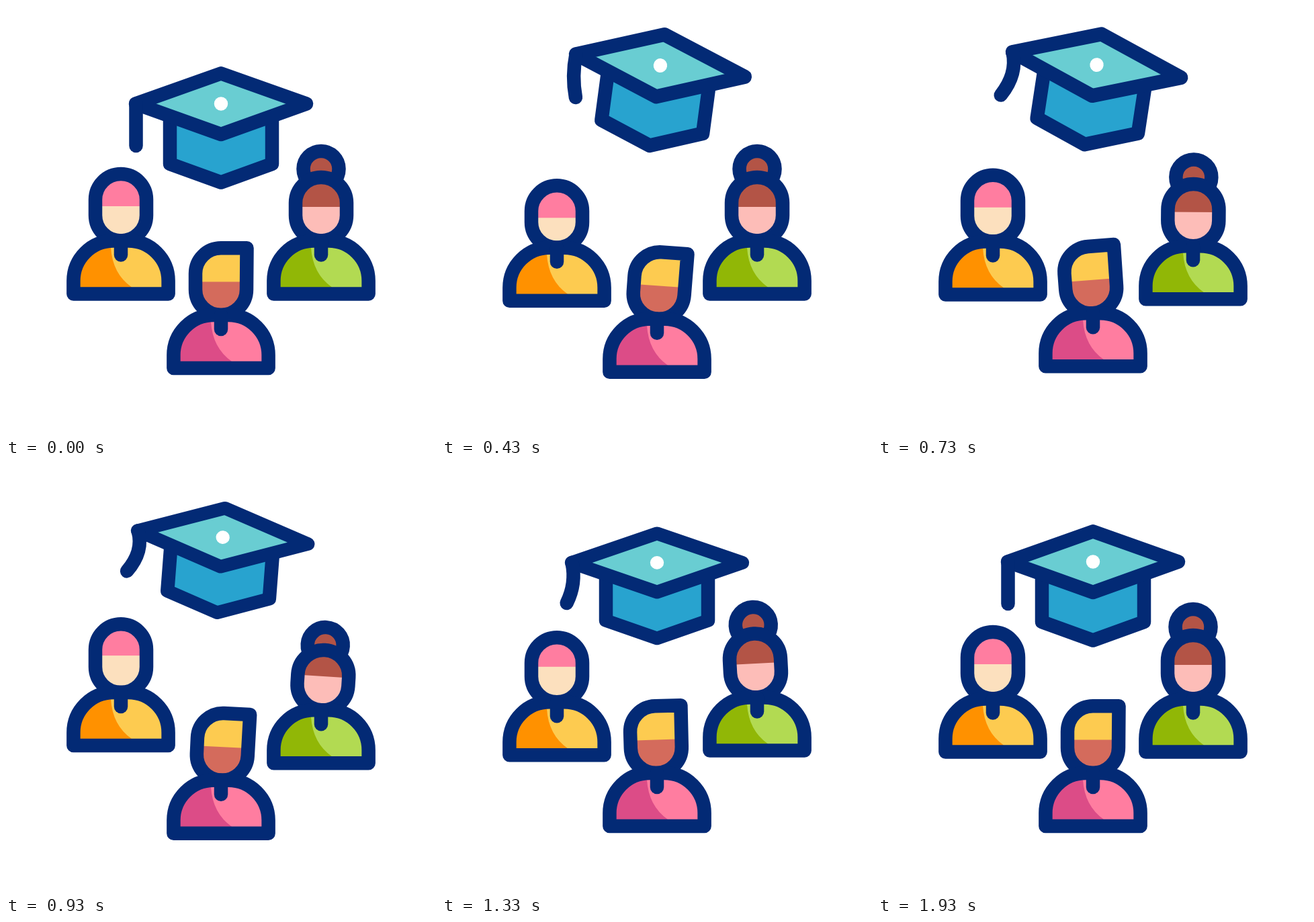
An HTML page with a canvas for the animation above (2.37 s loop, 640x640 px).

```html
<!DOCTYPE html>
<html lang="en">
<head>
<meta charset="utf-8">
<title>Graduates</title>
<style>
html, body { margin: 0; width: 100%; height: 100%; overflow: hidden; background: #fff; }
canvas { display: block; width: 640px; height: 640px; }
</style>
</head>
<body>
<canvas id="stage" width="640" height="640"></canvas>
<script>
const ctx = document.getElementById('stage').getContext('2d');
const LOOP = 2370;
const NAVY = '#032a75';
const BEAT = 300;
const RAD = Math.PI / 180;

// Smooth swing from rest through evenly spaced peaks and back to rest
function swing(t, peaks, step = BEAT) {
  const i = Math.floor(t / step);
  const p = t / step - i;
  const from = peaks[i - 1] || 0, to = peaks[i] || 0;
  return from + (to - from) * p * p * (3 - 2 * p);
}

function poly(points, close) {
  ctx.beginPath();
  points.forEach(([x, y]) => ctx.lineTo(x, y));
  if (close) ctx.closePath();
}

function paint(fill) {
  ctx.fillStyle = fill;
  ctx.fill();
  ctx.stroke();
}

// Shoulder line at y = 0
const torso = new Path2D('M-70.6 79V59.6A59.6 59.6 0 0 1 -11 0H11A59.6 59.6 0 0 1 70.6 59.6V79Z');
const shade = new Path2D('M-80 0H-15V10Q-12.5 49 16 69V90H-80Z');

function body(dark, light) {
  ctx.fillStyle = light;
  ctx.fill(torso);
  ctx.save();
  ctx.clip(torso);
  ctx.fillStyle = dark;
  ctx.fill(shade);
  ctx.restore();
  ctx.stroke(torso);
  poly([[0, 0], [0, 21]]);
  ctx.stroke();
}

// Chin at y = 0
function head(top, split, hair, skin, quiff) {
  ctx.beginPath();
  ctx.arc(0, -38, 38, 0, Math.PI);
  ctx.arc(0, top + 38, 38, Math.PI, Math.PI * 1.5);
  if (quiff) ctx.lineTo(38.5, top);
  else ctx.arc(0, top + 38, 38, Math.PI * 1.5, Math.PI * 2);
  ctx.closePath();
  ctx.fillStyle = skin;
  ctx.fill();
  ctx.save();
  ctx.clip();
  ctx.fillStyle = hair;
  ctx.fillRect(-60, top - 20, 120, split - top + 20);
  ctx.restore();
  ctx.stroke();
}

const people = [
  { x: 171, y: 349.5, delay: 268, top: -99.5, split: -51.5, give: 0.7, tilts: [], nod: -10,
    hair: '#ff7da0', skin: '#fce0be', dark: '#ff9100', light: '#fdcb50' },
  { x: 469, y: 349.5, delay: 595, top: -94.5, split: -50.5, give: 0.3, tilts: [3.8, -3.8, 2.2], nod: 0,
    hair: '#b35446', skin: '#fdbdb8', dark: '#91b706', light: '#b2da52', bun: true },
  { x: 320, y: 460, delay: 0, top: -99.7, split: -49.5, give: 0, tilts: [5.2, -5.2, 3.1, -2], nod: 0,
    hair: '#fdcb50', skin: '#d46b5c', dark: '#dc4c87', light: '#ff7da0', quiff: true }
];

function person(o, time) {
  const t = time - o.delay;
  const dy = swing(t, [18, -12, 11]);
  const squash = dy * (dy > 0 ? o.give : Math.min(o.give, 0.25));
  const nod = swing(t - 2 * BEAT, [o.nod]) + squash * (o.nod ? 1 : 0);

  ctx.save();
  ctx.translate(o.x, o.y + dy);
  ctx.save();
  ctx.rotate(swing(t - 70, o.tilts) * RAD);
  if (o.bun) {
    ctx.beginPath();
    ctx.arc(0, -107 + squash * 2, 26.5, 0, Math.PI * 2);
    paint(o.hair);
  }
  head(o.top + squash, o.split + nod, o.hair, o.skin, o.quiff);
  ctx.restore();
  body(o.dark, o.light);
  ctx.restore();
}

function cap(t) {
  // Ballistic toss with a stretch on the way up and a squash on landing
  const p = Math.min(1, Math.max(0, (t - 42) / 1098));
  const cy = 181.5 - 61.5 * 4 * p * (1 - p);
  const angle = RAD * swing(t, [9.6], 610);
  const sy = 1 + swing(t - 120, [0.04, -0.07], 490);

  ctx.save();
  ctx.translate(320, cy);
  ctx.rotate(angle);
  ctx.scale(1, sy);
  poly([[-76, -16], [-76, 53.5], [0, 81], [76, 53.5], [76, -16]]);
  paint('#28a3cf');
  poly([[0, -81.2], [127, -36], [0, 9.5], [-127, -36]], true);
  paint('#69cdd2');
  ctx.fillStyle = '#fff';
  ctx.beginPath();
  ctx.arc(0, -36, 10.2, 0, Math.PI * 2);
  ctx.fill();
  ctx.restore();

  // Tassel hangs from the left corner
  const c = Math.cos(angle), s = Math.sin(angle);
  const x = 320 - 126.5 * c + 36 * sy * s;
  const y = cy - 126.5 * s - 36 * sy * c;
  const drift = swing(t, [0, -18.5, -12.5], 390);
  const bend = swing(t, [-7, 8, 10.5], 390);
  ctx.beginPath();
  ctx.moveTo(x, y);
  ctx.quadraticCurveTo(x + bend, y + 32 * sy, x + drift, y + 62.5 * sy);
  ctx.stroke();
}

function draw(t) {
  ctx.fillStyle = '#fff';
  ctx.fillRect(0, 0, 640, 640);
  ctx.strokeStyle = NAVY;
  ctx.lineWidth = 20.5;
  ctx.lineCap = ctx.lineJoin = 'round';
  cap(t);
  people.forEach(o => person(o, t));
}

const start = performance.now();
function tick() {
  draw((performance.now() - start) % LOOP);
  requestAnimationFrame(tick);
}
tick();
</script>
</body>
</html>
```
